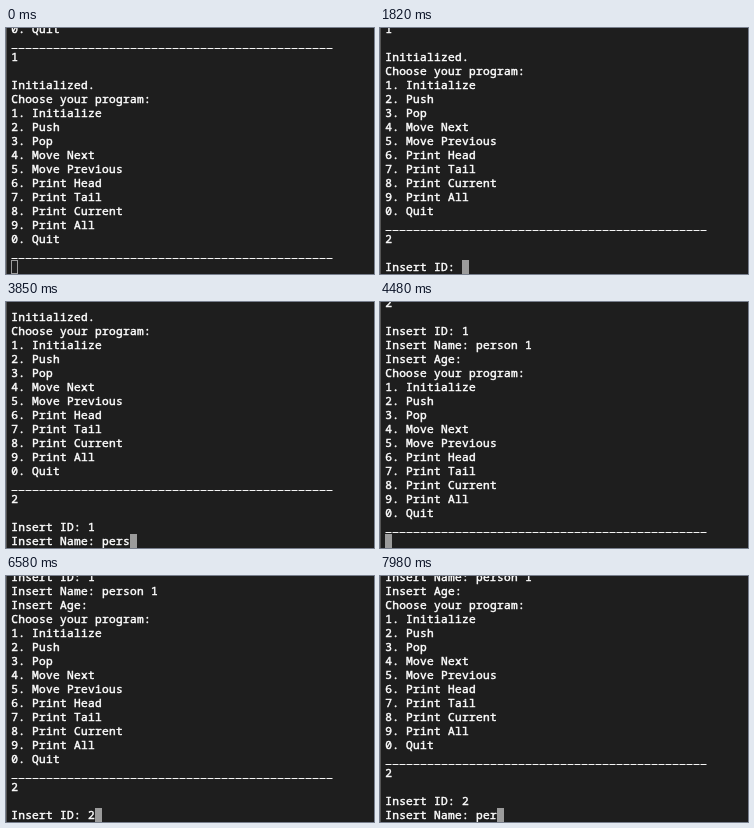
Write an HTML page that moves like this. It is 368 px wide and 246 px high and loops after 8 s.

```html
<!DOCTYPE html>
<html lang="en">
<head>
<meta charset="utf-8">
<title>Linked list menu</title>
<style>
  html, body { margin: 0; width: 100%; height: 100%; overflow: hidden; background: #1e1e1e; }
  svg { display: block; width: 368px; height: 246px; }
  text {
    font: 500 11.2px "Noto Sans Mono", "DejaVu Sans Mono", monospace;
    letter-spacing: 0.28px;
    white-space: pre;
    fill: #fff;
    stroke: #fff;
    stroke-width: 0.45px;
  }
  .rule { stroke: #f4f4f4; stroke-width: 1.1; stroke-dasharray: 6 1; }
</style>
</head>
<body>
<svg id="screen" viewBox="0 0 368 246"></svg>
<script>
const LOOP = 8000, LEFT = 5, CHAR = 7, LINE = 14, HEIGHT = 246, ROWS = 18;
const FOCUS_AT = 630;

const RULE = "_".repeat(46);
const MENU = [
  "Choose your program:", "1. Initialize", "2. Push", "3. Pop", "4. Move Next",
  "5. Move Previous", "6. Print Head", "7. Print Tail", "8. Print Current",
  "9. Print All", "0. Quit", RULE, ""
].join("\n");
const START = `0. Quit\n${RULE}\n1\n\nInitialized.\n${MENU}`;

// [time in ms, terminal output]; "\b" erases one character
const STEPS = [
  [1680, "2"], [1820, "\n\nInsert ID: "],
  [2660, "1"], [2730, "\nInsert Name: "],
  [3570, "p"], [3710, "e"], [3780, "r"], [3850, "s"], [3920, "o"],
  [4060, "n"], [4130, " "], [4340, "1"],
  [4480, `\nInsert Age: \n${MENU}`],
  [5530, "2"], [5670, "\n\nInsert ID: "],
  [6580, "2"], [6650, "\nInsert Name: "],
  [7070, "p"], [7140, "e"], [7210, "r"], [7350, "s"], [7490, "o"],
  [7840, "\b"], [7980, "\b"]
];

const screen = document.getElementById("screen");

function add(tag, attrs) {
  const el = document.createElementNS("http://www.w3.org/2000/svg", tag);
  for (const key in attrs) el.setAttribute(key, attrs[key]);
  return screen.appendChild(el);
}

// window edge
add("rect", { width: 1, height: HEIGHT, fill: "#555" });

const rows = Array.from({ length: ROWS }, (_, i) => {
  const top = HEIGHT - (ROWS - i) * LINE;
  return {
    text: add("text", { x: LEFT + 0.15, y: top + 11 }),
    rule: add("line", {
      class: "rule", x1: LEFT + 0.5, x2: LEFT + RULE.length * CHAR,
      y1: top + 12.5, y2: top + 12.5
    })
  };
});
const block = add("rect", { y: HEIGHT - LINE, width: CHAR, height: LINE, fill: "#9b9b9b" });
const outline = add("rect", {
  x: LEFT + 0.5, y: HEIGHT - LINE + 0.5, width: CHAR - 1, height: LINE - 1,
  fill: "none", stroke: "#9b9b9b"
});

function outputAt(time) {
  let out = START;
  for (const [at, chunk] of STEPS) {
    if (at > time) break;
    out = chunk === "\b" ? out.slice(0, -1) : out + chunk;
  }
  return out;
}

let shown = null;

function draw(time) {
  const focused = time >= FOCUS_AT;
  block.style.display = focused ? "" : "none";
  outline.style.display = focused ? "none" : "";

  const out = outputAt(time);
  if (out === shown) return;
  shown = out;
  const lines = out.split("\n").slice(-ROWS);
  rows.forEach(({ text, rule }, i) => {
    const isRule = lines[i] === RULE;
    text.textContent = isRule ? "" : lines[i];
    rule.style.display = isRule ? "" : "none";
  });
  block.setAttribute("x", LEFT + lines[ROWS - 1].length * CHAR);
}

const begin = performance.now();
function tick() {
  draw((performance.now() - begin) % LOOP);
  requestAnimationFrame(tick);
}
tick();
</script>
</body>
</html>
```
